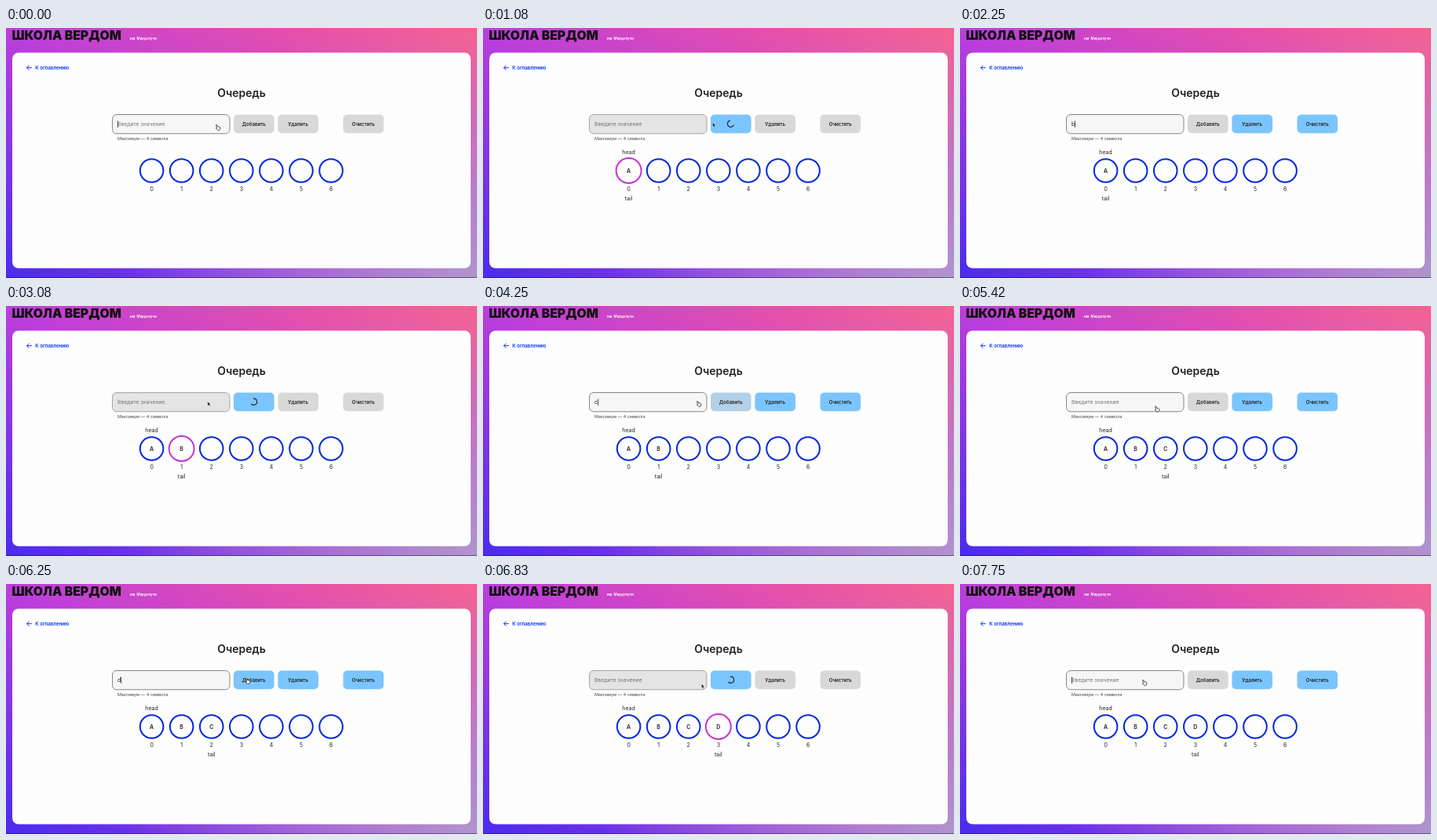
An HTML page that plays this animation: 600 by 319 pixels, repeating every 8000 ms.

```html
<!DOCTYPE html>
<html lang="ru">
<head>
<meta charset="utf-8">
<style>
  html, body { margin: 0; width: 100%; height: 100%; overflow: hidden; }
  body {
    background:
      radial-gradient(ellipse 75% 110% at 100% 100%, #b094cc, #b094cc00),
      linear-gradient(to top right, #4a2bef, #bd3edb 50%, #ff5c8a);
  }
  svg { display: block; width: 600px; height: 319px; font: 7px Inter, sans-serif; fill: #222; }
  .mid { text-anchor: middle; }
  .strong { font-weight: 600; font-size: 6.15px; }
  .link { fill: #0032ff; }
  .ring { fill: none; stroke-width: 2; }
</style>
</head>
<body>
<svg id="stage" viewBox="0 0 600 319">
  <text x="7.5" y="15" font-size="15.8" font-weight="900" fill="#111">ШКОЛА ВЕРДОМ</text>
  <text x="158" y="14.7" font-size="4.4" font-weight="600" fill="#fff">им. Мирдолучи</text>
  <rect x="8" y="31.5" width="584" height="275" rx="8" fill="#fdfdfd"/>
  <rect y="318" width="600" height="1" fill="#1d1440" opacity=".5"/>
  <path d="M32.8 50.7H26.6M29.4 47.8L26.5 50.7L29.4 53.6" fill="none" stroke="#0032ff"/>
  <text x="37.3" y="53.2" class="strong link">К оглавлению</text>
  <text x="300" y="88.3" class="mid" font-size="14" font-weight="600">Очередь</text>
  <rect id="field" x="135.5" y="110.5" width="149.5" height="24.3" rx="5.5"/>
  <text id="entry" x="142" y="125.4"></text>
  <rect id="caret" y="118.5" width=".8" height="8.5"/>
  <text x="142" y="143" font-size="5.4" fill="#444">Максимум — 4 символа</text>
  <path id="spinner" d="M0-4.1A4.1 4.1 0 1 1-3.55 2.05" fill="none" stroke="#222" stroke-width="1.1"/>
  <text id="head" class="mid" x="185.6" y="161">head</text>
  <text id="tail" class="mid" y="219.8">tail</text>
  <g id="cursor" stroke-width=".8" stroke-linejoin="round">
    <path id="hand" d="M-2.4-3.3L-1.5-3.5L0-1L1.6-1.2L2.8 0L2.9 2L1.8 3.4H-.2L-2.6.9L-1.4.5Z" fill="#fff" stroke="#222"/>
    <path id="arrow" d="M-1.6-3.2V2.3L-.3 1.2L.6 3.2L1.5 2.8L.6.9H2.2Z" fill="#111" stroke="#fff" stroke-width=".4"/>
  </g>
</svg>
<script>
const DURATION = 8000, FADE = 200;
const GREY = [216, 216, 216], SKY = [122, 197, 253], BLUE = [2, 40, 218], PURPLE = [200, 50, 212];

const pushes = [
  { letter: 'a', typed: 250, click: 850, done: 1350, focus: 1500 },
  { letter: 'b', typed: 2250, click: 2850, done: 3350, focus: 3500 },
  { letter: 'c', typed: 4165, click: 4750, done: 5200, focus: 5600 },
  { letter: 'd', typed: 5920, click: 6520, done: 7020, focus: 7580 }
];

// time, x, y
const pointerPath = [
  [0, 270, 127], [250, 270, 127], [600, 308, 123], [900, 308, 123], [1400, 262, 126],
  [2250, 262, 126], [2600, 306, 124], [2880, 306, 124], [3080, 258.5, 125], [3830, 262, 126],
  [4100, 262, 126], [4250, 275, 125], [4500, 308, 124], [4800, 308, 124], [5420, 251, 131.5],
  [5750, 250, 128], [5920, 250, 128], [6250, 308, 124], [6560, 308, 124], [6830, 280, 130.5],
  [7250, 240, 126], [7750, 235, 126], [8000, 235, 126]
];

const stage = document.getElementById('stage');
const el = id => document.getElementById(id);
const set = (node, attrs) => Object.entries(attrs).forEach(([k, v]) => node.setAttribute(k, v));
const show = (node, visible) => { node.style.display = visible ? '' : 'none'; };
const smooth = p => p * p * (3 - 2 * p);
const ramp = (t, start) => smooth(Math.min(1, Math.max(0, (t - start) / FADE)));
const mix = (a, b, p) => `rgb(${a.map((v, i) => v + (b[i] - v) * p)})`;
const slotX = i => 185.6 + i * 38.08;

function add(tag, attrs, text = '', before = null) {
  const node = document.createElementNS(stage.namespaceURI, tag);
  set(node, attrs);
  node.textContent = text;
  return stage.insertBefore(node, before);
}

const buttons = [[290, 'Добавить'], [346.4, 'Удалить'], [429.5, 'Очистить']].map(([x, label]) => ({
  box: add('rect', { x, y: 110.5, width: 51.6, height: 23.8, rx: 5 }, '', el('spinner')),
  label: add('text', { x: x + 25.8, y: 124.6, class: 'mid strong' }, label, el('spinner'))
}));

const slots = Array.from({ length: 7 }, (_, i) => {
  const x = slotX(i);
  add('text', { x, y: 207.8, class: 'mid' }, i, el('cursor'));
  return {
    ring: add('circle', { cx: x, cy: 182, class: 'ring' }, '', el('cursor')),
    value: add('text', { x, y: 184.6, class: 'mid', 'font-weight': 600 },
      pushes[i] ? pushes[i].letter.toUpperCase() : '', el('cursor'))
  };
});

function pointerAt(t) {
  const next = Math.max(1, pointerPath.findIndex(p => p[0] > t));
  const [t0, x0, y0] = pointerPath[next - 1], [t1, x1, y1] = pointerPath[next];
  const p = smooth((t - t0) / (t1 - t0));
  return [x0 + (x1 - x0) * p, y0 + (y1 - y0) * p];
}

function draw(t) {
  const busy = pushes.some(p => t >= p.click && t < p.done);
  const typing = pushes.find(p => t >= p.typed && t < p.click);
  const count = pushes.filter(p => t >= p.click).length;
  const focused = pushes.some(p => t >= p.focus && t < p.focus + 500);

  const addLevel = pushes.reduce((s, p) => s + ramp(t, p.typed) - ramp(t, p.done), 0);
  const otherLevel = pushes.reduce((s, p, i) => s + ramp(t, p.done) - (i ? ramp(t, p.click) : 0), 0);
  buttons.forEach((b, i) => set(b.box, { fill: mix(GREY, SKY, i ? otherLevel : addLevel) }));
  show(buttons[0].label, !busy);
  show(el('spinner'), busy);
  set(el('spinner'), { transform: `translate(315.6 122.2) rotate(${(t - 3080) / 750 * 360 - 10})` });

  set(el('field'), { fill: busy ? '#e4e4e4' : '#f6f6f6', stroke: busy ? '#a5a5a5' : '#858585' });
  el('entry').textContent = typing ? typing.letter : 'Введите значение';
  set(el('entry'), { fill: typing ? '#222' : '#757575', 'font-size': typing ? 7 : 6.8 });
  show(el('caret'), typing || focused || t < 250);
  set(el('caret'), { x: typing ? 146.3 : 142 });

  slots.forEach(({ ring, value }, i) => {
    const p = pushes[i];
    const glow = p ? ramp(t, p.click) - ramp(t, p.done) : 0;
    set(ring, { r: 14.8 + 1.2 * glow, stroke: mix(BLUE, PURPLE, glow) });
    show(value, i < count);
  });
  show(el('head'), count);
  show(el('tail'), count);
  set(el('tail'), { x: slotX(Math.max(0, count - 1)) });

  const [x, y] = pointerAt(t);
  set(el('cursor'), { transform: `translate(${x} ${y})` });
  show(el('cursor'), !pushes.some(p => t >= p.typed && t < p.typed + 80));
  show(el('hand'), !busy);
  show(el('arrow'), busy);
}

function frame() {
  draw(performance.now() % DURATION);
  requestAnimationFrame(frame);
}
frame();
</script>
</body>
</html>
```
